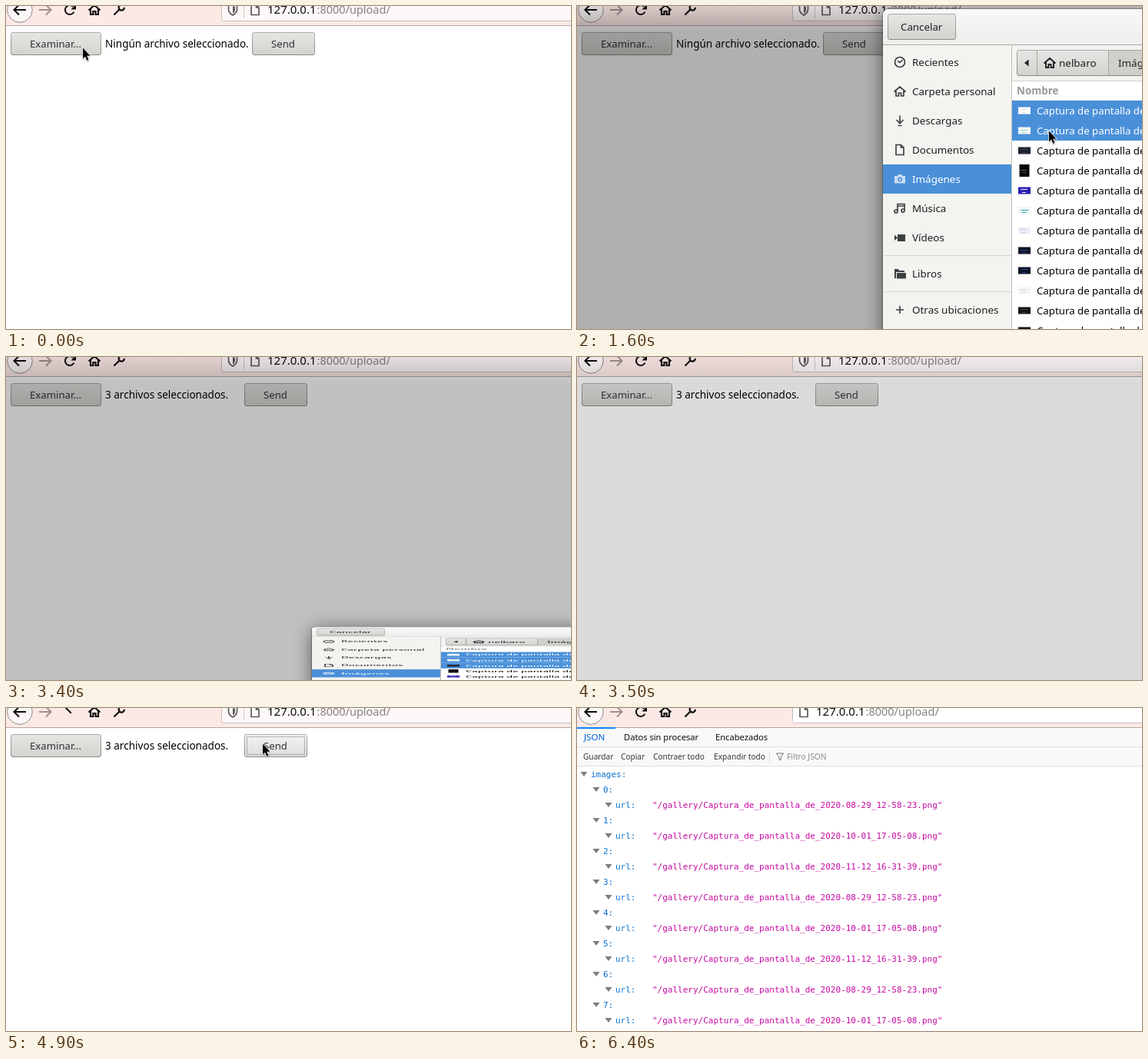
An HTML page with a canvas for the animation above (6.9 s loop, 735x420 px).

```html
<!DOCTYPE html>
<html lang="es">
<head>
<meta charset="utf-8">
<title>Upload</title>
<style>
  html, body { margin: 0; width: 100%; height: 100%; overflow: hidden; background: #fff; }
  canvas { display: block; }
</style>
</head>
<body>
<canvas id="stage" width="735" height="420"></canvas>
<script>
const W = 735, H = 420, LOOP = 6900, STEP = 100;
const c = document.getElementById('stage').getContext('2d');
const UI = '"Noto Sans", "Open Sans", sans-serif';
const MONO = '"DejaVu Sans Mono", monospace';
const INK = '#1c2022', BLUE = '#4a90d9';

const ICONS = {
  clock: 'M6.5 0A6.5 6.5 0 1 1-6.5 0A6.5 6.5 0 1 1 6.5 0M-3-1.5L0 .5L3.5-3',
  house: 'M-7.5 .5L0-6L7.5 .5M-5-1V6H-1.6V2H1.6V6H5V-1',
  down: 'M0-6.5V3M-4.5-1L0 3.5L4.5-1M-2.5 6.5H2.5',
  page: 'M-5-6.5H1.5L5-3V6.5H-5ZM1.5-6.5V-3H5',
  note: 'M-3 4V-5.5H6V3M-3-3H6M-3 4A2 2 0 1 1-7 4A2 2 0 1 1-3 4M6 3A2 2 0 1 1 2 3A2 2 0 1 1 6 3',
  camera: 'M-7-4H-3L-2-6H2L3-4H7V5.5H-7ZM3 .5A3 3 0 1 0-3 .5A3 3 0 1 0 3 .5M1.5 .5A1.5 1.5 0 1 1-1.5 .5A1.5 1.5 0 1 1 1.5 .5',
  video: 'M-3-4H7V5H-3ZM-7-3.5L-3 .5L-7 4Z',
  folder: 'M-7-6H-2L-1-4H6V-2H-5V6H-7ZM-4-1H8V6.5H-4Z',
  plus: 'M-5 0H5M0-5V5',
  back: 'M8 0H-7M-1-6.5L-7.5 0L-1 6.5',
  wrench: 'M-6.5 6.5L1.5-1.5M3.5-6.5A3.6 3.6 0 1 0 6.8-3.2',
  shield: 'M0-7L5.5-5V0C5.5 4 2.5 6 0 7.5C-2.5 6-5.5 4-5.5 0V-5Z',
  shieldHalf: 'M0-4.5V5C2 4 3 2.5 3 0V-3.5Z',
  funnel: 'M-4.5-4.5H4.5L1.2 0V4.5L-1.2 3V0Z'
};

const PLACES = [
  [73, 'clock', 'Recientes'], [111, 'house', 'Carpeta personal'], [149, 'down', 'Descargas'],
  [187, 'page', 'Documentos'], [225, 'camera', 'Imágenes'], [263, 'note', 'Música'],
  [301, 'video', 'Vídeos'], [348, 'folder', 'Libros'], [395, 'plus', 'Otras ubicaciones']
];
const SOLID = ['camera', 'video', 'folder'];

// thumbnail: background and accent
const THUMBS = ['#fff #e8e4da', '#f4f8f6 #9cd0c4', '#1d2230 #3c4254', '#050507 #555', '#2a1fb0 #f2eef8',
  '#eef4f6 #2aa0b8', '#eef0f8 #b4c0dc', '#0e1428 #27407c', '#0c1024 #2c4aa0', '#f6f6f6 #d4d4d4',
  '#141414 #4a453c', '#141a22 #39424e'];
const STAMPS = ['2020-08-29_12-58-23', '2020-10-01_17-05-08', '2020-11-12_16-31-39'];

// pointer path: time, x, y
const PATH = [
  [0, 100, 54], [700, 100, 54], [1200, 604, 163], [1300, 609, 166], [1400, 614, 162], [1600, 614, 162],
  [1900, 614, 189], [2000, 614, 189], [2100, 614, 196], [2400, 614, 196], [2600, 667, 112], [2700, 760, 0],
  [3600, 760, 30], [4000, 338, 48], [4400, 338, 48], [4500, 334, 46], [5000, 334, 46], [5100, 334, 47],
  [5300, 334, 47], [5400, 333, 47], [5500, 333, 47], [5600, 332, 47], [5800, 332, 47], [5900, 331, 47],
  [6000, 331, 47], [6300, 136, -4], [6400, 120, -40], [LOOP, 120, -40]
];

const clamp = v => Math.max(0, Math.min(1, v));
const within = (t, a, b) => t >= a && t < b;

function box(x, y, w, h, fill) {
  c.fillStyle = fill;
  c.fillRect(x, y, w, h);
}

function text(s, x, y, size = 13.45, color = INK, font = UI, weight = 400) {
  c.font = `${weight} ${size}px ${font}`;
  c.fillStyle = color;
  c.fillText(s, x, y);
}

function icon(name, x, y, color = INK, width = 1.7, solid = false) {
  const shape = new Path2D(ICONS[name]);
  c.save();
  c.translate(x, y);
  c.fillStyle = c.strokeStyle = color;
  c.lineWidth = width;
  if (solid) c.fill(shape, 'evenodd'); else c.stroke(shape);
  c.restore();
}

function line(d, color, width) {
  c.strokeStyle = color;
  c.lineWidth = width;
  c.stroke(new Path2D(d));
}

function fade(y0, y1, from, to) {
  const g = c.createLinearGradient(0, y0, 0, y1);
  g.addColorStop(0, from);
  g.addColorStop(1, to);
  return g;
}

function button(x, y, w, h, state = '') {
  const [top, end] = { hover: ['#f3f3f2', '#dcdcda'], down: ['#c4c4c0', '#d2d2ce'] }[state] || ['#e6e6e4', '#d2d2ce'];
  c.beginPath();
  c.roundRect(x + .5, y + .5, w - 1, h - 1, 2.5);
  c.fillStyle = fade(y, y + h, top, end);
  c.fill();
  c.lineWidth = 1;
  c.strokeStyle = fade(y, y + h, '#acaca8', '#8b8b87');
  c.stroke();
}

function dotted(x, y, w, h, color) {
  c.setLineDash([1, 1]);
  c.lineWidth = 1;
  c.strokeStyle = color;
  c.strokeRect(x + .5, y + .5, w - 1, h - 1);
  c.setLineDash([]);
}

function formButton(label, x, w, state, focused) {
  button(x, 34, w, 30, state);
  text(label, x + 25, 54, 13.2, '#2e3436');
  if (focused) dotted(x + 3, 37, w - 6, 24, '#777');
}

function reloadIcon(t) {
  if (within(t, 4800, 5600)) {
    const a = 12 * clamp((t - 4750) / 230), b = 12 * clamp((t - 5000) / 100);
    line(`M77-1l${a} ${a}`, '#0c0c0d', 2);
    if (b) line(`M89-1l${-b} ${b}`, '#0c0c0d', 2);
    return;
  }
  const spin = within(t, 4600, 4800) ? (t - 4500) / 130 : 0;
  c.save();
  c.translate(83, 5);
  c.rotate(spin);
  c.strokeStyle = c.fillStyle = '#0c0c0d';
  c.lineWidth = 2;
  c.beginPath();
  c.arc(0, 0, 6, .45, 5.5);
  c.stroke();
  c.fill(new Path2D('M8-7V-.5H1.5Z'));
  c.restore();
}

function toolbar(t, done) {
  box(0, 0, W, 25, '#fce9e6');
  box(0, 25, W, 1, '#b5a5a2');
  c.beginPath();
  c.arc(18, 5, 16.3, 0, 7);
  c.fillStyle = '#fbf7f6';
  c.fill();
  c.lineWidth = 1;
  c.strokeStyle = '#8f8988';
  c.stroke();
  icon('back', 18, 5, '#0c0c0d', 2.1);
  c.save();
  c.translate(51, 5);
  c.scale(-1, 1);
  icon('back', 0, 0, '#a0918f', 2);
  c.restore();
  reloadIcon(t);
  icon('house', 115, 5, '#0c0c0d', 2.1);
  icon('wrench', 147, 5, '#0c0c0d', 2.2);

  c.beginPath();
  c.roundRect(280.5, -12.5, 470, 32, 3);
  c.fillStyle = done ? '#fff' : '#fdf9f8';
  c.fill();
  c.lineWidth = 1;
  c.strokeStyle = '#c9bfbd';
  c.stroke();
  const x = done ? 311 : 340;
  if (!done) {
    icon('shield', 295, 4.5, '#5c5a5a', 1.7);
    icon('shieldHalf', 295, 4.5, '#5c5a5a', 1, true);
    box(309, 0, 1, 16, '#cfc8c6');
  }
  icon('page', x - 16, 5, '#5c5a5a', 1.7);
  text('127.0.0.1', x, 10, 15, '#0c0c0d');
  text(':8000/upload/', x + 64.5, 10, 14.5, '#85807f');
}

function form(t) {
  const chosen = t >= 3400;
  const first = within(t, 300, 400) ? 'down' : '';
  formButton('Examinar...', 6, 118, first, within(t, 300, 600));
  text(chosen ? '3 archivos seleccionados.' : 'Ningún archivo seleccionado.', 129, 54, 13.55, '#000');
  const send = within(t, 4500, 4600) ? 'down' : t >= 4000 ? 'hover' : '';
  formButton('Send', chosen ? 310 : 320, 82, send, t >= 4500);
}

function twisty(x, y) {
  c.fillStyle = '#7d7d80';
  c.fill(new Path2D(`M${x} ${y - 3}h9l-4.5 6z`));
}

function jsonView() {
  box(0, 26, W, 50, '#f9f9fa');
  box(0, 50, W, 1, '#e0e0e2');
  box(0, 75, W, 1, '#e0e0e2');
  box(0, 25, 50, 2, '#0a84ff');
  text('JSON', 9, 42, 11.6, '#0060df');
  text('Datos sin procesar', 61, 42, 11.15, '#0c0c0d');
  text('Encabezados', 180, 42, 11.15, '#0c0c0d');
  [['Guardar', 8], ['Copiar', 57], ['Contraer todo', 99], ['Expandir todo', 178]]
    .forEach(([s, x]) => text(s, x, 67, 10.15, '#38383d'));
  box(250, 55, 1, 16, '#e0e0e2');
  icon('funnel', 264, 63.5, '#737373', 1);
  text('Filtro JSON', 273, 67, 10.3, '#8a8a8e');

  const key = '#0870cf';
  twisty(4.5, 86);
  text('images:', 18, 90, 11, key, MONO);
  for (let i = 0; i < 8; i++) {
    const y = 106 + i * 40;
    twisty(20.5, y);
    text(i + ':', 34, y + 4, 11, key, MONO);
    twisty(36.5, y + 20);
    text('url:', 50, y + 24, 11, key, MONO);
    text(`"/gallery/Captura_de_pantalla_de_${STAMPS[i % 3]}.png"`, 98, y + 24, 11, '#c40aa0', MONO);
  }
}

function shade(level) {
  if (!level) return;
  const a = .31 * level;
  box(0, 0, W, H, fade(-4, 32, `rgba(0,0,0,${a * .35})`, `rgba(0,0,0,${a})`));
}

function thumb(i, y) {
  const [bg, accent] = THUMBS[i].split(' ');
  const [w, h] = i === 3 ? [13, 16] : [16, 9];
  box(582 - w / 2, y - h / 2, w, h, bg);
  box(576 + i % 3, y - 2 + i % 2, 9, 1, accent);
  box(579, y + 2, 5, 1, accent);
}

function fileRows(t) {
  const picked = t >= 2100 ? 3 : t >= 1600 ? 2 : 1;
  THUMBS.forEach((_, i) => {
    const y = 123 + i * 26, on = i < picked;
    if (on) box(566, y, W - 566, 26, BLUE);
    thumb(i, y + 13);
    text('Captura de pantalla de 2020', 598, y + 17.8, 13.25, on ? '#fff' : '#000');
  });
  if (picked === 1) dotted(567, 123, 180, 26, '#a9cbee');
}

function dialog(t) {
  // collapses towards its own middle line
  const s = t < 3400 ? 1 : .272;
  c.save();
  c.translate(0, 481 * (1 - s));
  c.scale(1, s);
  c.beginPath();
  c.roundRect(398, 4, 700, 954, 7);
  c.shadowColor = 'rgba(0,0,0,.55)';
  c.shadowBlur = 24;
  c.shadowOffsetY = 3;
  c.fillStyle = '#f3f3f1';
  c.fill();
  c.shadowColor = 'transparent';
  c.lineWidth = 2;
  c.strokeStyle = 'rgba(0,0,0,.25)';
  c.stroke();
  c.clip();
  box(398, 4, 400, 46, fade(4, 50, '#f8f8f8', '#eeeeed'));
  box(398, 50, 400, 1, '#adada9');
  button(404, 10, 89, 34);
  text('Cancelar', 421, 31.8, 13.3);

  box(398, 51, 167, 907, '#f3f3ef');
  for (const [y, name, label] of PLACES) {
    const on = name === 'camera';
    if (on) box(398, y - 19, 167, 38, BLUE);
    icon(name, 420, y, on ? '#c9def3' : '#3c4143', 1.7, SOLID.includes(name));
    text(label, 436, y + 4.8, 13.45, on ? '#fff' : INK);
  }
  box(398, 324, 167, 1, '#d5d5d1');
  box(398, 371, 167, 1, '#d5d5d1');

  box(565, 51, 1, 907, '#c1c1bd');
  box(566, 97, 400, 861, '#fff');
  box(566, 97, 400, 1, '#d0d0cc');
  button(572, 57, 220, 34);
  box(692, 58, 100, 32, '#cfcfcb');
  box(598, 58, 1, 32, '#a5a5a1');
  box(691, 58, 1, 32, '#a5a5a1');
  c.fillStyle = INK;
  c.fill(new Path2D('M587.5 69.5V78.5L582 74Z'));
  icon('house', 615, 74, INK, 1.9);
  text('nelbaro', 627, 78.8);
  text('Imágenes', 704, 78.8);
  text('Nombre', 572, 114.8, 13.4, within(t, 2600, 2700) ? '#5b6062' : '#97999a', UI, 700);
  box(566, 122, 400, 1, '#ededeb');
  fileRows(t);
  c.restore();
}

function pointer(t) {
  const i = PATH.findIndex((p, n) => t >= p[0] && t < PATH[n + 1][0]);
  const [t0, x0, y0] = PATH[i], [t1, x1, y1] = PATH[i + 1];
  const k = (t - t0) / (t1 - t0);
  c.save();
  c.translate(Math.round(x0 + (x1 - x0) * k), Math.round(y0 + (y1 - y0) * k));
  const arrow = new Path2D('M0 .5V14.5L3 11.7L5.4 17L7.6 16L5.3 10.8H9.5Z');
  c.lineWidth = 1.4;
  c.strokeStyle = '#fff';
  c.shadowColor = 'rgba(0,0,0,.3)';
  c.shadowBlur = 2;
  c.shadowOffsetY = 1;
  c.stroke(arrow);
  c.shadowColor = 'transparent';
  c.fillStyle = '#000';
  c.fill(arrow);
  c.restore();
}

function draw(t) {
  box(0, 0, W, H, '#fff');
  const done = t >= 5100;
  toolbar(t, done);
  if (!done) form(t);
  if (t >= 5200) jsonView();
  shade(t < 600 ? 0 : t < 3400 ? clamp((t - 490) / 300) : clamp(1 - (t - 3330) / 320));
  if (within(t, 600, 3500)) dialog(t);
  pointer(t);
}

const start = performance.now();
function tick() {
  const t = (performance.now() - start) % LOOP;
  draw(Math.floor(t / STEP) * STEP);
  requestAnimationFrame(tick);
}
tick();
</script>
</body>
</html>
```
